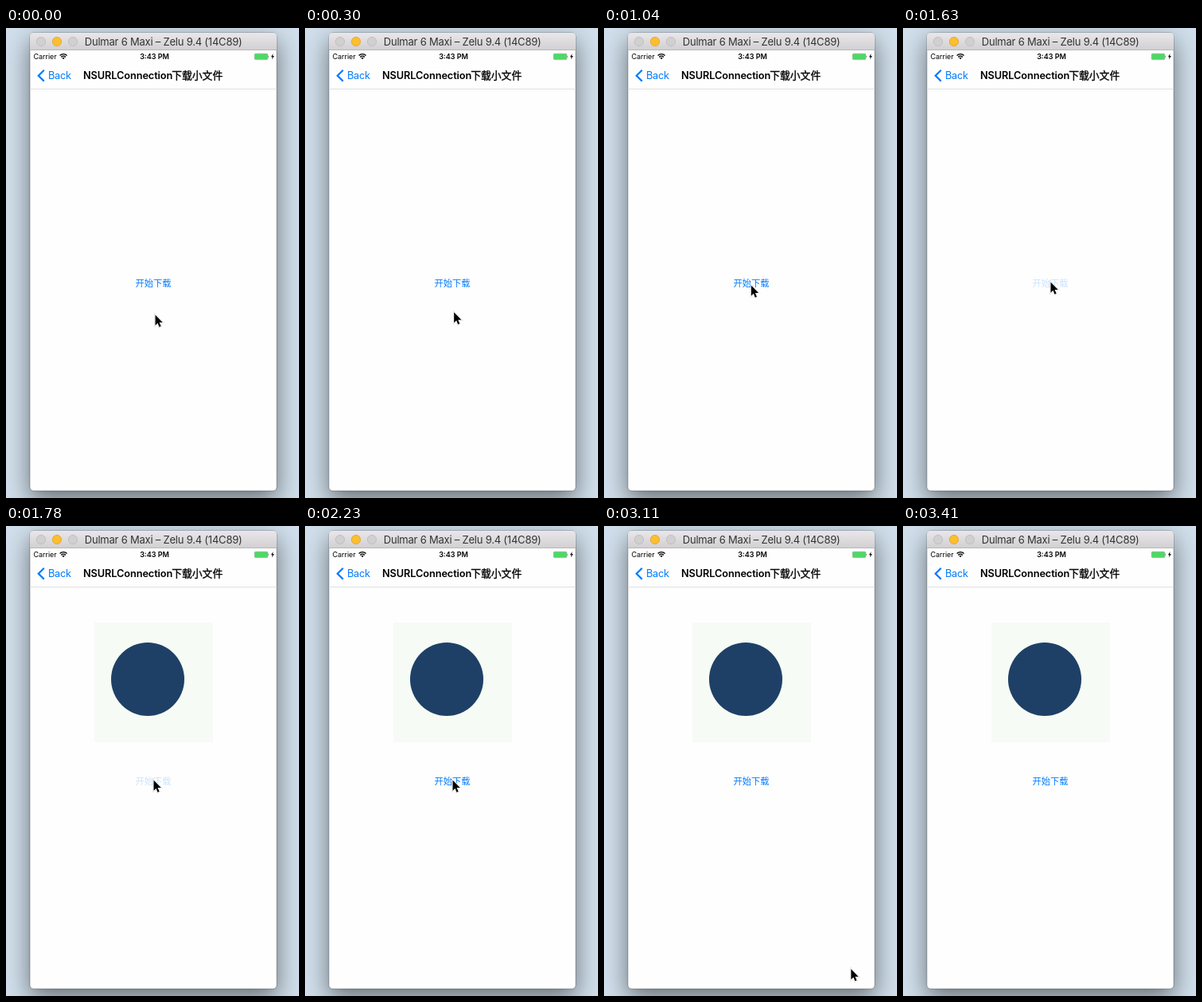
Animation, 368 px wide and 589 px high, one loop 3730 ms. Source, as an HTML page:

```html
<!DOCTYPE html>
<html lang="zh">
<head>
<meta charset="utf-8">
<style>
  html, body { margin: 0; width: 100%; height: 100%; overflow: hidden; background: #d0dfeb; }
  svg { display: block; width: 368px; height: 589px; overflow: hidden; }
  text { font-family: Inter, "Noto Sans CJK SC", "Noto Sans CJK", sans-serif; }
  .shadow { filter: drop-shadow(0 11px 15px rgba(0, 0, 0, .5)); }
  .blue { fill: #007aff; }
  #cursor { paint-order: stroke; filter: drop-shadow(0 .7px .7px rgba(0, 0, 0, .4)); }
</style>
</head>
<body>
<svg viewBox="0 0 368 589">
  <defs>
    <linearGradient id="bar" x2="0" y2="1">
      <stop stop-color="#e9e7e9"/><stop offset="1" stop-color="#d1cfd1"/>
    </linearGradient>
    <clipPath id="window"><rect x="30" y="6" width="310" height="574" rx="4.5"/></clipPath>
  </defs>

  <!-- window -->
  <rect class="shadow" x="30" y="6" width="310" height="574" rx="4.5" fill="#fefefe" stroke="#000" stroke-opacity=".3"/>
  <g clip-path="url(#window)">
    <rect x="30" y="6" width="310" height="22" fill="url(#bar)"/>
    <path d="M30 27.5H340" stroke="#bab8ba"/>
    <path d="M30 76.5H340" stroke="#e0e0e0"/>
  </g>
  <g fill="#d0d0d0" stroke="#bababa" stroke-width=".8">
    <circle cx="44" cy="17" r="5.6"/>
    <circle cx="64" cy="17" r="5.6" fill="#fdbe2f" stroke="#dfa225"/>
    <circle cx="84" cy="17" r="5.6"/>
  </g>
  <text x="197.7" y="22" font-size="13" letter-spacing="-.22" text-anchor="middle" fill="#333">Dulmar 6 Maxi – Zelu 9.4 (14C89)</text>

  <!-- status bar -->
  <text x="34.5" y="39" font-size="9" letter-spacing="-.05">Carrier</text>
  <path d="M67.6 34.4a6.500 6.500 0 0 1 9 0M69.300 36.400a4 4 0 0 1 5.600 0" fill="none" stroke="#000" stroke-width="1.4"/>
  <path d="M72.1 39.3l-1.6-1.700a2.300 2.300 0 0 1 3.200 0Z"/>
  <text x="186.5" y="39" font-size="9" font-weight="600" text-anchor="middle">3:43 PM</text>
  <rect x="312.2" y="32.2" width="16.6" height="7.4" rx="1.3" fill="#4cd964" stroke="#8fa594" stroke-width=".6"/>
  <path d="M329.5 34.5q1.5 1.4 0 2.8Z" fill="#444"/>
  <path d="M335.6 32l-2.7 4.3h1.7l-.7 3.3 2.9-4.5h-1.8Z"/>

  <!-- navigation bar -->
  <path d="M47.8 52.8L40.8 59.7L47.8 66.6" fill="none" stroke="#007aff" stroke-width="2.2"/>
  <text class="blue" x="53" y="64" font-size="12.75" letter-spacing="-.3">Back</text>
  <text x="97" y="64" font-size="12.75" font-weight="600" letter-spacing="-.1">NSURLConnection</text>
  <text x="208.2" y="64" font-size="12.8" stroke="#000" stroke-width=".35">下载小文件</text>

  <!-- downloaded picture -->
  <g id="picture">
    <rect x="111" y="121" width="149" height="150" fill="#f6fbf5"/>
    <circle cx="178" cy="192" r="46" fill="#1f4066"/>
  </g>

  <text id="button" class="blue" x="162.6" y="324" font-size="11.25">开始下载</text>

  <path id="cursor" d="M0 0V13.200L3 10.300L5 15.200L7.100 14.300L5.100 9.600H9.300Z" stroke="#fff" stroke-width="2"/>
</svg>
<script>
  const LOOP = 3730, TICK = 445 / 3;
  const $ = id => document.getElementById(id);
  const clamp = p => Math.min(1, Math.max(0, p));
  const smooth = p => p * p * (3 - 2 * p);

  // [tick, x, y] of the pointer tip; it speeds up along each leg
  const path = [
    [1, 187.5, 359.5], [4, 185.5, 340.5], [5, 184.5, 324.5], [9, 185.5, 318.5],
    [17, 185.5, 318.5], [19, 233.5, 427.5], [20, 298.5, 538.5], [23, 367, 635]
  ];

  function tip(tick) {
    const i = Math.max(1, path.findIndex(k => k[0] >= tick));
    const [t0, x0, y0] = path[i - 1], [t1, x1, y1] = path[i];
    const p = clamp((tick - t0) / (t1 - t0)) ** 1.6;
    return [x0 + (x1 - x0) * p, y0 + (y1 - y0) * p];
  }

  // The screen was sampled once per tick, so everything moves in steps.
  function draw(t) {
    const tick = Math.min(23, Math.floor((t + 5) / TICK));
    $('cursor').setAttribute('transform', `translate(${tip(tick)})`);
    $('button').setAttribute('opacity', tick < 11 ? 1 : .2 + .8 * smooth(clamp((tick - 12) / 2.5)));
    $('picture').setAttribute('visibility', tick < 12 ? 'hidden' : 'visible');
  }

  const start = performance.now();
  function frame() {
    draw((performance.now() - start) % LOOP);
    requestAnimationFrame(frame);
  }
  frame();
</script>
</body>
</html>
```
